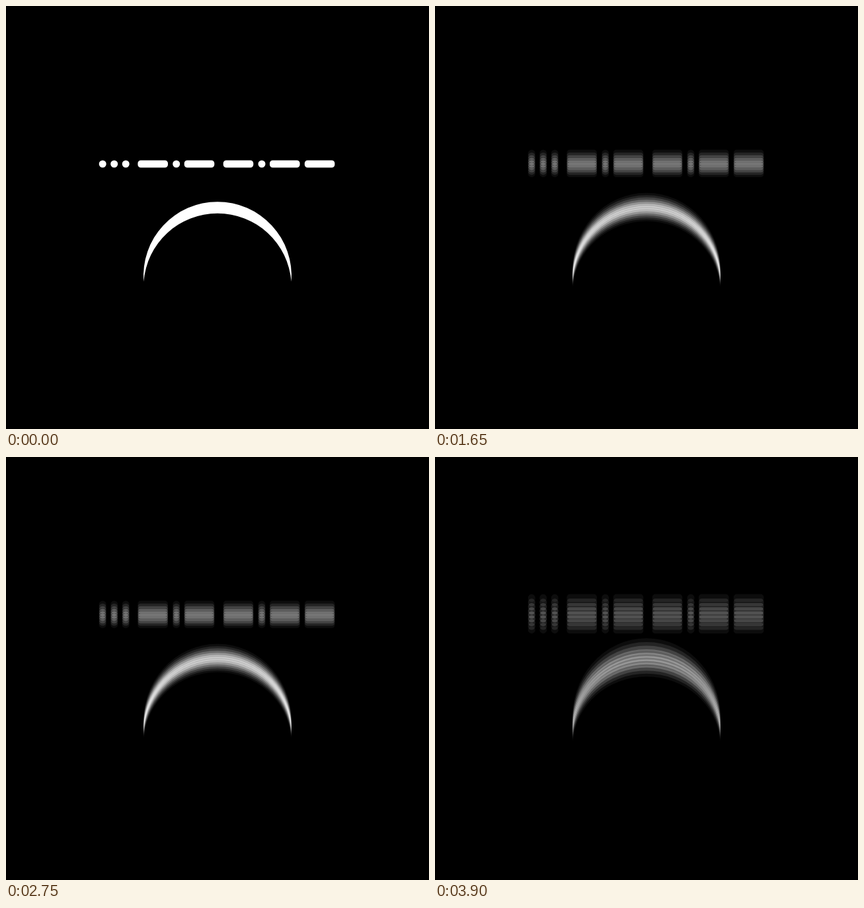
Write an HTML page with a canvas that moves like this. It is 640 by 640 pixels and loops after 4000 ms.

```html
<!DOCTYPE html>
<html lang="en">
<head>
<meta charset="utf-8">
<title>Crescent</title>
<style>
html, body { margin: 0; width: 100%; height: 100%; overflow: hidden; background: #000; }
canvas { display: block; }
</style>
</head>
<body>
<canvas id="stage" width="640" height="640"></canvas>
<script>
const SIZE = 640, LOOP = 4000, TICK = 50;
const ctx = document.getElementById("stage").getContext("2d");

// Blur weights from the middle copy outwards.
const WEIGHTS = [16, 15, 12, 9, 5];
const TOTAL = 98;

// Each pulse rises evenly to its peak, holds, then drops with gathering speed.
const PULSES = [
  { rise: 1000, top: 1500, fall: 1650, end: 1900, peak: 0.0097 },
  { rise: 2100, top: 2200, fall: 2450, end: 2500, peak: 0.0078 },
  { rise: 2650, top: 2750, fall: 2950, end: 3050, peak: 0.0094 },
  { rise: 3200, top: 3350, fall: 3500, end: 3600, peak: 0.012 },
  { rise: 3800, top: 3900, fall: LOOP, end: LOOP, peak: 0.015 }
];

// Share of a ramp done at t, counting the tick now begun.
function progress(t, from, to) {
  const u = (t - from + TICK) / (to - from + TICK);
  return t < from ? 0 : Math.min(u, 1);
}

function blurAt(time) {
  const t = Math.floor(time / TICK) * TICK;
  const p = PULSES.find(p => t >= p.rise && t < p.end);
  if (!p) return 0;
  return p.peak * progress(t, p.rise, p.top) * (1 - progress(t, p.fall, p.end) ** 2);
}

function buildShape() {
  const path = new Path2D();
  const midY = 239, r = 5.5, dash = 45.6;

  // Morse: a dot or dash advances the pen, a space widens the gap.
  let x = 140.7;
  for (const c of "... -.- -.--") {
    if (c === ".") {
      path.moveTo(x + 2 * r, midY);
      path.arc(x + r, midY, r, 0, Math.PI * 2);
      x += 17.5;
    } else if (c === "-") {
      path.roundRect(x, midY - r, dash, r * 2, 4.5);
      x += dash + 7.2;
    } else {
      x += 6.2;
    }
  }

  // One disc with an equal disc, shifted down, cut out of it.
  const mid = SIZE / 2, radius = 112, top = 296.2, shift = 17.5;
  const tipY = top + radius + shift / 2;
  const half = Math.sqrt(radius ** 2 - (shift / 2) ** 2);
  path.addPath(new Path2D(
    `M${mid - half} ${tipY}A${radius} ${radius} 0 1 1 ${mid + half} ${tipY}` +
    `A${radius} ${radius} 0 0 0 ${mid - half} ${tipY}Z`));
  return path;
}

const shape = buildShape();

// Draws the shape scaled in height about the bottom edge.
function drawCopy(scale, light) {
  const level = Math.round(255 * light);
  ctx.setTransform(1, 0, 0, scale, 0, SIZE * (1 - scale));
  ctx.fillStyle = `rgb(${level},${level},${level})`;
  ctx.fill(shape);
}

function render(t) {
  const blur = blurAt(t);
  ctx.setTransform(1, 0, 0, 1, 0, 0);
  ctx.globalCompositeOperation = "source-over";
  ctx.fillStyle = "#000";
  ctx.fillRect(0, 0, SIZE, SIZE);
  if (!blur) return drawCopy(1, 1);
  ctx.globalCompositeOperation = "lighter";
  for (let i = -4; i <= 4; i++) drawCopy(1 / (1 + i * blur), WEIGHTS[Math.abs(i)] / TOTAL);
}

function frame() {
  render(performance.now() % LOOP);
  requestAnimationFrame(frame);
}
frame();
</script>
</body>
</html>
```
